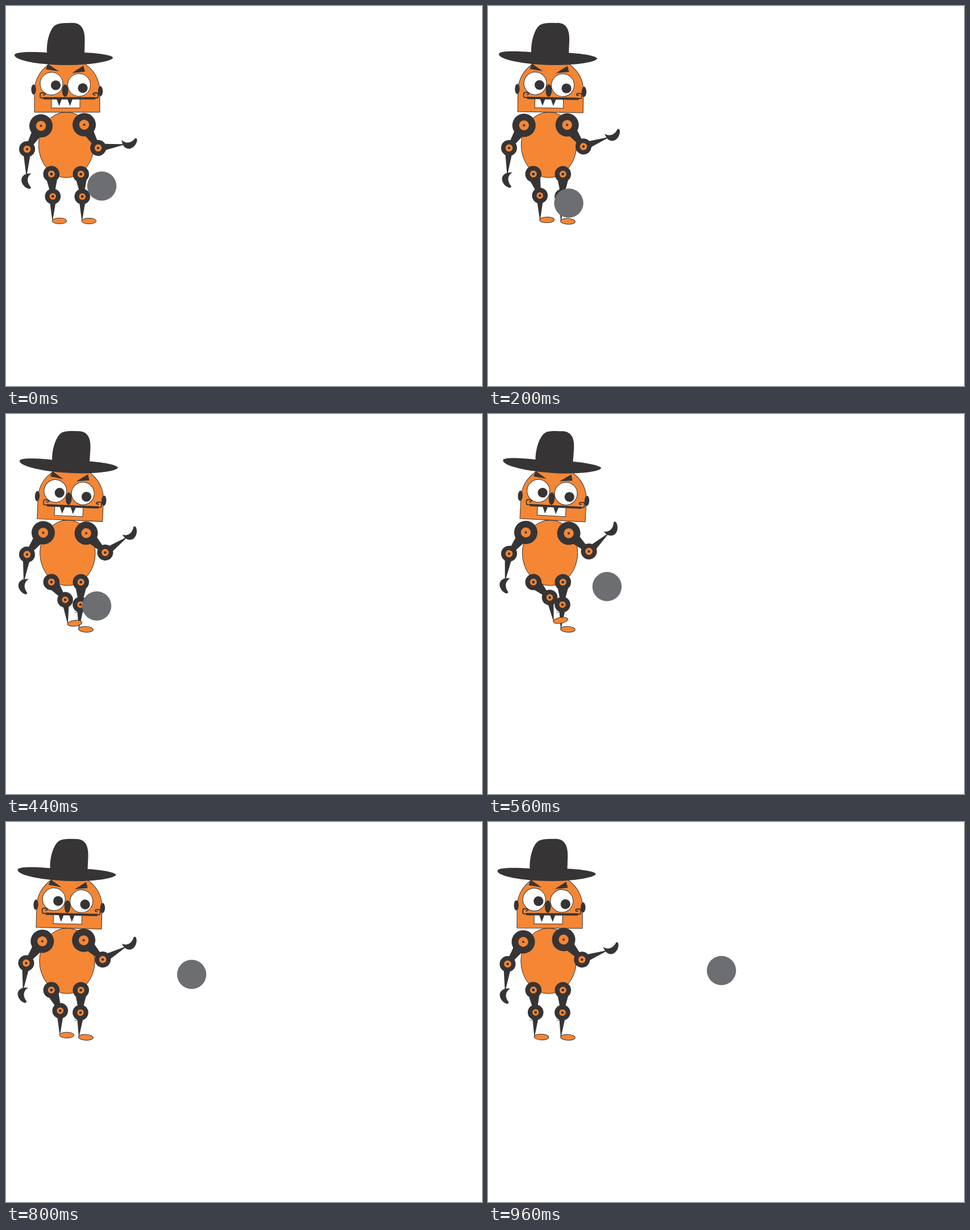
These frames come from a looping animation (837x669 px, 1 s). An HTML page with a canvas:

```html
<!DOCTYPE html>
<html lang="en">
<head>
<meta charset="utf-8">
<title>Robot kick</title>
<style>
html, body { margin: 0; height: 100%; overflow: hidden; background: #fff; }
canvas { display: block; }
</style>
</head>
<body>
<canvas id="stage" width="837" height="669"></canvas>
<script>
const c = document.getElementById('stage').getContext('2d');
const DARK = '#373435', ORANGE = '#f58634', WHITE = '#fff', GRAY = '#6d6e71';
const STEP = 40, STEPS = 25;
const POSES = [0, 14, 24];                // main poses, in steps
const LEG = [0, 5, 9, 14, 16, 20, 24];
const BALL = [0, 5, 9, 10, 12, 14, 16, 20, 24];
let step = 0;

function at(vals, keys = POSES) {
  let i = 1;
  while (i < keys.length - 1 && step > keys[i]) i++;
  const k = (step - keys[i - 1]) / (keys[i] - keys[i - 1]);
  return vals[i - 1] + (vals[i] - vals[i - 1]) * k;
}

function group(x, y, deg, draw) {
  c.save();
  c.translate(x, y);
  c.rotate(deg * Math.PI / 180);
  draw();
  c.restore();
}

function paint(path, fill, line) {
  const p = new Path2D(path);
  c.fillStyle = fill;
  c.fill(p);
  if (line) outline(p, 1);
}

function outline(path, width) {
  c.strokeStyle = DARK;
  c.lineWidth = width;
  c.stroke(path);
}

function oval(x, y, rx, ry, fill, line) {
  const p = new Path2D();
  p.ellipse(x, y, rx, ry, 0, 0, 7);
  c.fillStyle = fill;
  c.fill(p);
  if (line) outline(p, 1);
}

function joint(r, ring, dot) {
  oval(0, 0, r, r, DARK);
  oval(0, 0, ring, ring, ORANGE);
  oval(0, 0, dot, dot, DARK);
}

// A limb of two segments; every segment points down at 0 degrees.
function limb(x, y, upper, lower, length, drawUpper, drawLower) {
  const a = upper * Math.PI / 180;
  group(x - Math.sin(a) * length, y + Math.cos(a) * length, lower, drawLower);
  group(x, y, upper, drawUpper);
}

function arm(x, y, upper, lower) {
  limb(x, y, upper, lower, 47.7, () => {
    paint('M-9 15H9L5 38H-5Z', DARK);
    joint(20.5, 8.7, 2);
  }, () => {
    paint('M-6 11H5.5L-.7 47H-1.5Z', DARK);
    paint('M7.5 43C2 46 0 53 1.5 58C2.5 62 5 65 7 67.5Q6 70 4 70' +
          'C-3 69-9.5 62-10 55C-10 48-4 42 7.5 43Z', DARK);
    joint(14, 6.3, 2.2);
  });
}

function leg(x, y, upper, lower) {
  limb(x, y, upper, lower, 39.6, () => {
    paint('M-9 10L10 8L5 28H-5Z', DARK);
    joint(14.3, 6, 2.5);
  }, () => {
    paint('M-5 11H5L-.2 42H-1Z', DARK);
    if (lower > 1.4) outline(new Path2D('M-10 14H-4'), .7);
    oval(11.7, 43, 12.8, 5.1, ORANGE, true);
    joint(13.8, 5.7, 2.4);
  });
}

function head() {
  c.translate(-107.5, -187);
  paint('M50 187V150A57.5 57.5 0 0 1 165 150V187Z', ORANGE, true);
  oval(48.6, 147, 4.2, 9, DARK);
  oval(166, 150, 4.2, 9, DARK);
  paint('M73.500 102L70 111.500L93 115Z', DARK);
  paint('M136 105L139 115.500L116 118Z', DARK);
  oval(80, 136.700, 20, 20, WHITE, true);
  oval(128.500, 139, 20, 20, WHITE, true);
  oval(87.500, 139.500, 8.600, 8.600, DARK);
  oval(135, 144.500, 8.600, 8.600, DARK);
  oval(104, 149, 5.300, 11, DARK);
  paint('M80 163H130V179.500H80Z', WHITE, true);
  paint('M89 164H98L93.500 176ZM108 164H117L112.500 176Z', DARK);
  outline(new Path2D('M66 162.500H157'), 4);
  outline(new Path2D('M67 161.500Q60 163 60 160V155Q60 153 63 153H66Q69 153 69 155T65 156.500' +
                     'M156 161.500Q162 163 162 160V155Q162 153 159 153H157Q153 153 153 155T157.500 156.500'), 1.800);
  paint('M15 86C16 81 40 80 72 82C71 60 78 42 84 36C90 29 105 30 116 29.700' +
        'C130 29 139 38 138.500 60L138 82C165 83 188 87 188 91' +
        'C187 97 150 104 108 104C60 104 14 96 15 86Z', DARK);
}

function draw(now) {
  step = Math.floor(now / STEP) % STEPS;
  c.fillStyle = WHITE;
  c.fillRect(0, 0, 837, 669);

  oval(at([106, 109, 106.5]), 244.5, 48.7, 57.7, ORANGE, true);
  group(at([107.5, 113.5, 108.5]), 187, at([0, 3, .3]), head);

  arm(at([61.5, 66.5, 62]), at([211, 208.5, 211]),
      at([30.8, 38.2, 35.2]), at([0, 7, 4]));
  arm(at([137.5, 142, 133]), at([209, 210, 207]),
      at([-31, -48, -42.4]), at([-99, -134, -111]));

  const settle = Math.min(step / 5, 1);
  leg(131.7, 296, -3.6 + 4.7 * settle, 3 * settle);
  leg(79.8, 295.8, at([-3.6, -16.8, -32, -46.5, -39.3, -23, -5.7], LEG),
      at([0, -1, -5, -10, -6, 0, 2], LEG));

  oval(at([168.5, 142, 137, 144, 175, 209.3, 247.8, 326.5, 410.5], BALL),
       at([317, 347, 355.5, 351, 325, 303.8, 290.5, 268.3, 261.5], BALL),
       25.7, 25.7, GRAY);

  requestAnimationFrame(draw);
}
requestAnimationFrame(draw);
</script>
</body>
</html>
```
